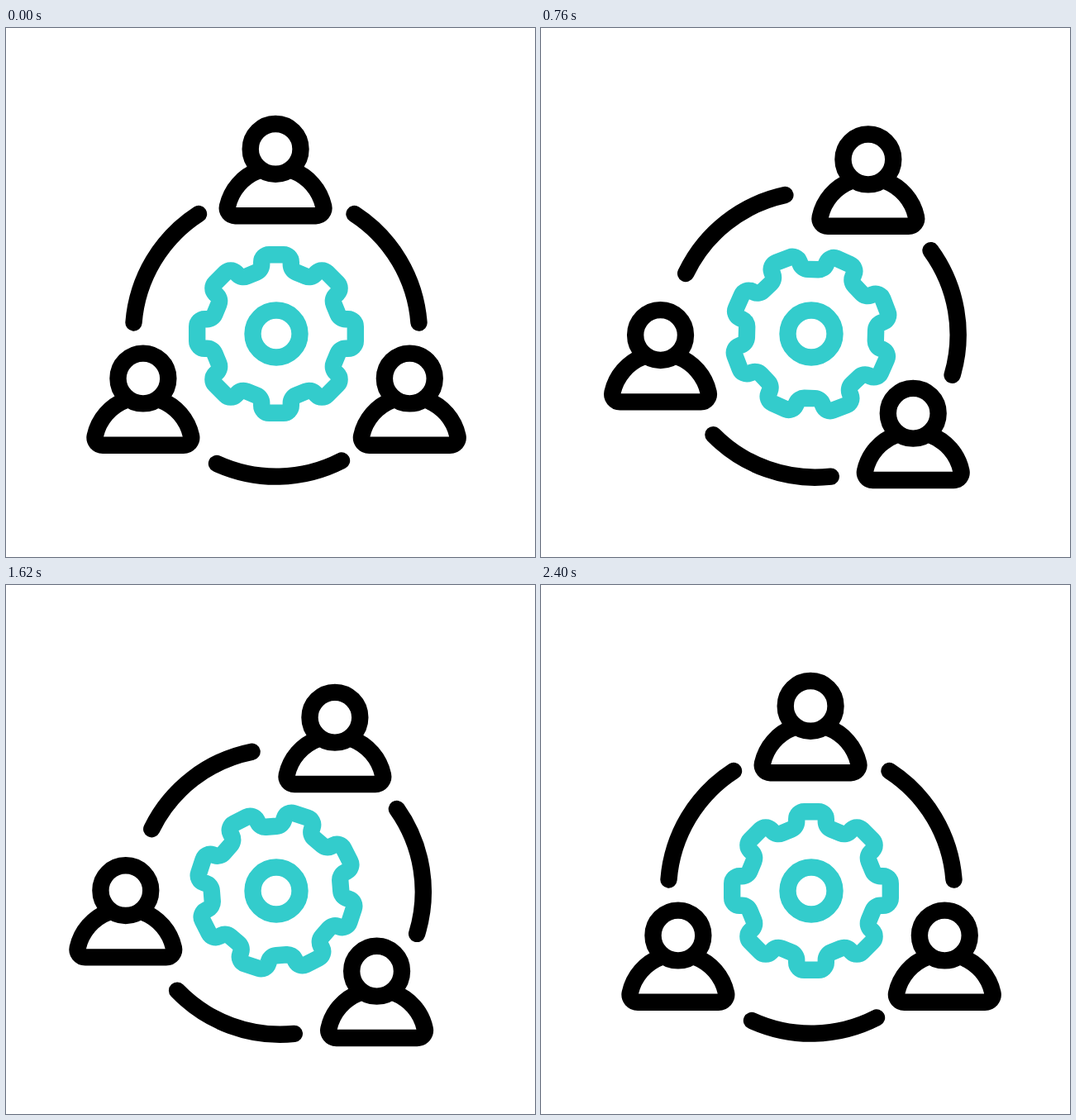
Animation, 640 px wide and 640 px high, one loop 2.42 s. Source, as an HTML page:

```html
<!DOCTYPE html>
<html lang="en">
<head>
<meta charset="utf-8">
<title>Team around a gear</title>
<style>
  html, body { margin: 0; width: 100%; height: 100%; overflow: hidden; background: #fff; }
  svg { display: block; width: 100%; height: 100%; }
</style>
</head>
<body>
<svg viewBox="0 0 640 640" fill="none" stroke-width="20.4" stroke-linecap="round" stroke-linejoin="round">
  <defs>
    <g id="person">
      <circle r="30.4"/>
      <path d="M-20.5 26A60 60 0 0 0-58.1 69.4C-59.4 75.3-55 80.8-48.9 80.8H48.9C55 80.8 59.4 75.3 58.1 69.4A60 60 0 0 0 20.5 26"/>
    </g>
  </defs>
  <g stroke="#33cccc" transform="translate(327 370)">
    <circle r="28.5"/>
    <path id="gear"/>
  </g>
  <g stroke="#000">
    <path id="ring" d="M154.5 356.5A172.9 172.9 0 0 1 233 225M421.5 225A172.9 172.9 0 0 1 499.5 356.5M406 523.5A172.9 172.9 0 0 1 255 527"/>
    <g id="team"></g>
  </g>
</svg>
<script>
const LOOP = 2420, HALF = 1200, STEP = 20;
const RAD = Math.PI / 180;
const gear = document.getElementById('gear');
const ring = document.getElementById('ring');
const team = document.getElementById('team');

// Each person follows a circular arc: start, arc length, first heading, turn (degrees).
const people = [
  { x: 326.1, y: 146.4, len: 104.3, dir: -11, turn: 61 },
  { x: 165.9, y: 424, len: 85, dir: 219, turn: 83 },
  { x: 488.3, y: 424, len: 83, dir: 115, turn: 49 }
];

for (const p of people) {
  p.el = document.createElementNS('http://www.w3.org/2000/svg', 'use');
  p.el.setAttribute('href', '#person');
  team.appendChild(p.el);
}

function gearPath(teeth, half, top, valley) {
  const a = Math.PI / teeth;
  const base = (valley - half * Math.sin(a)) / Math.cos(a);
  const tooth = [[-half, -base, 10, 0], [-half, -top, 9, 1], [half, -top, 9, 1], [half, -base, 10, 0]];
  const pts = [];
  for (let k = 0; k < teeth; k++) {
    const c = Math.cos(2 * a * k), s = Math.sin(2 * a * k);
    for (const [x, y, r, sweep] of tooth) pts.push([x * c - y * s, x * s + y * c, r, sweep]);
  }
  return pts.map((p, i) => {
    const unit = q => {
      const dx = q[0] - p[0], dy = q[1] - p[1], d = Math.hypot(dx, dy);
      return [dx / d, dy / d];
    };
    const u = unit(pts[(i + pts.length - 1) % pts.length]);
    const v = unit(pts[(i + 1) % pts.length]);
    const cut = p[2] / Math.tan(Math.acos(u[0] * v[0] + u[1] * v[1]) / 2);
    const at = w => (p[0] + w[0] * cut).toFixed(2) + ' ' + (p[1] + w[1] * cut).toFixed(2);
    return `${i ? 'L' : 'M'}${at(u)}A${p[2]} ${p[2]} 0 0 ${p[3]} ${at(v)}`;
  }).join('') + 'Z';
}

function draw(ms) {
  const t = Math.min(Math.floor((ms % LOOP) / STEP + 1e-6) * STEP, 2 * HALF);
  const s = 1 - Math.abs(t - HALF) / HALF;
  const p = s * s * (3 - 2 * s);

  gear.setAttribute('transform', `rotate(${t / (2 * HALF) * 360})`);
  ring.setAttribute('transform', `rotate(${30 * p} 326.5 383)`);

  for (const { el, x, y, len, dir, turn } of people) {
    const half = turn * p / 2 * RAD;
    const chord = len * p * (half ? Math.sin(half) / half : 1);
    const a = dir * RAD + half;
    el.setAttribute('transform', `translate(${x + chord * Math.cos(a)} ${y + chord * Math.sin(a)})`);
  }
}

gear.setAttribute('d', gearPath(8, 17.8, 95.8, 78));

const start = performance.now();
function tick() {
  draw(performance.now() - start);
  requestAnimationFrame(tick);
}
draw(0);
requestAnimationFrame(tick);
</script>
</body>
</html>
```
